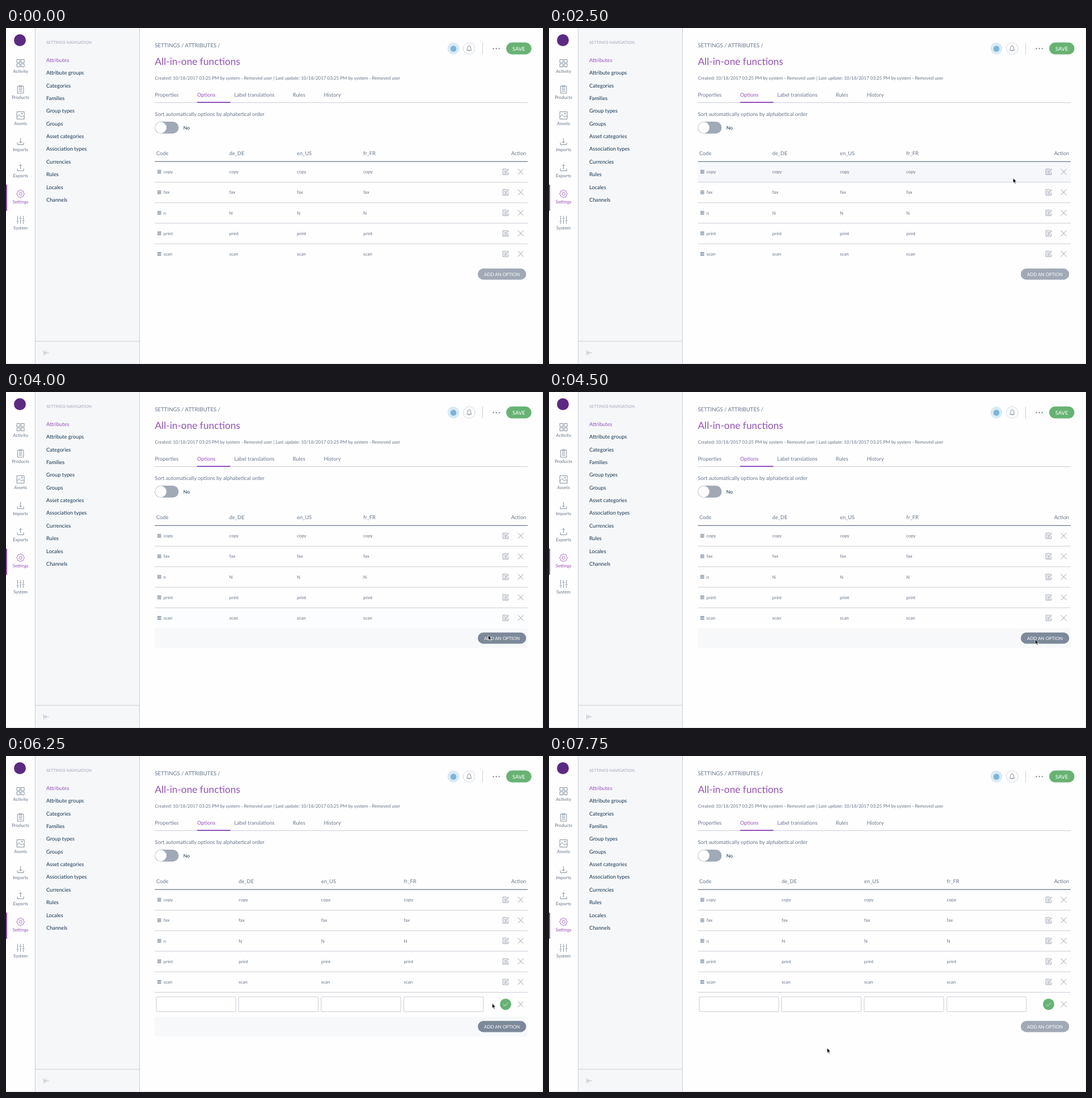
Recreate the animation shown at these times as an HTML page. Size 947 by 592 pixels, loop 8000 ms.

```html
<!DOCTYPE html>
<html lang="en">
<head>
<meta charset="utf-8">
<title>Attribute options</title>
<style>
html, body { margin: 0; width: 100%; height: 100%; overflow: hidden; background: #fefefe; }
svg { display: block; width: 947px; height: 592px; font-family: Lato, "Open Sans", sans-serif; text-rendering: geometricPrecision; }
.icon { fill: none; stroke: #67768a; stroke-width: .8; }
.light { stroke: #9aa3b0; stroke-width: .75; }
</style>
</head>
<body>
<svg id="stage" viewBox="0 0 947 592"></svg>
<script>
const PURPLE = '#9452ba', GREY = '#67768a', NAVY = '#11324d', LINE = '#c9cdd6', GREEN = '#67b373';
const ROW = 36.17, TOP = 235.6;
const stage = document.getElementById('stage');

// y is the middle of the capitals
const text = (s, x, y, size = 9.25, fill = GREY, anchor = 'start') =>
  `<text x="${x}" y="${y + size * .36}" font-size="${size}" fill="${fill}" text-anchor="${anchor}">${s}</text>`;
const rect = (x, y, w, h, fill, extra = '') =>
  `<rect x="${x}" y="${y}" width="${w}" height="${h}" fill="${fill}" ${extra}/>`;
const circle = (x, y, r, fill, extra = '') => `<circle cx="${x}" cy="${y}" r="${r}" fill="${fill}" ${extra}/>`;
const icon = (x, y, d, extra = '') => `<path class="icon" transform="translate(${x} ${y})" d="${d}" ${extra}/>`;
const cross = y => icon(907.6, y, 'M-5-5L5 5M5-5L-5 5', 'style="stroke:#808b9b"');

function gear() {
  let d = '';
  for (let i = 0; i < 32; i++) {
    const a = (i - .5) * Math.PI / 16, r = i % 4 < 2 ? 6.9 : 5.5;
    d += (i ? 'L' : 'M') + (r * Math.cos(a)).toFixed(2) + ' ' + (r * Math.sin(a)).toFixed(2);
  }
  return d + 'ZM2.5 0A2.5 2.5 0 1 1-2.5 0A2.5 2.5 0 1 1 2.5 0';
}

function menu() {
  const items = [
    ['Activity', 'M-6.5-6.5h5.5v5.5h-5.5zM1-6.5h5.5v5.5H1zM-6.5 1h5.5v5.5h-5.5zM1 1h5.5v5.5H1z'],
    ['Products', 'M-2-5.5h-3.3V6.8H5.3V-5.5H2M-2-6.8H2v2.3H-2zM-3-2H3M-3 .7H3M-3 3.4H3'],
    ['Assets', 'M-6.5-6.5h13v13h-13zM-6.5 3l4-4.5L1.5 3 4 .5 6.5 3M3.6-3.3a1 1 0 1 1-2 0a1 1 0 1 1 2 0'],
    ['Imports', 'M-5.5 1.5V5.5H5.5V1.5M0-6V2.5M-2.6 0L0 2.6 2.6 0'],
    ['Exports', 'M-5.5 1.5V5.5H5.5V1.5M0 2.5V-5.5M-2.6-3L0-5.6 2.6-3'],
    ['Settings', gear()],
    ['System', 'M-5-7V1.5M-5 4V7M0-7V-4M0-1.5V7M5-7V0M5 2.5V7M-7 2.7h4M-2-2.7h4M3 1.2h4']
  ];
  return items.map(([name, d], i) => {
    const on = name == 'Settings', y = 62 + 46.03 * i;
    return icon(25.6, y, d, on ? `style="stroke:${PURPLE}"` : '') +
      text(name, 25.6, y + 14.3, 7.95, on ? PURPLE : GREY, 'middle');
  }).join('');
}

function sidebar() {
  const names = ['Attributes', 'Attribute groups', 'Categories', 'Families', 'Group types', 'Groups',
    'Asset categories', 'Association types', 'Currencies', 'Rules', 'Locales', 'Channels'];
  return rect(52, 0, 183, 591, '#f6f7f9') +
    rect(51, 0, 1, 591, LINE) + rect(235, 0, 1, 591, LINE) + rect(52, 551.5, 183, 1, LINE) +
    text('SETTINGS NAVIGATION', 71, 25.6, 7.3, '#a1a9b7') +
    names.map((s, i) => text(s, 71, 56.6 + 22.36 * i, 9.25, i ? NAVY : PURPLE)).join('') +
    icon(70.5, 572.3, 'M-3.8-4.5V4.5M5 0H-2.5M.8-3.3L-2.5 0 .8 3.3', 'style="stroke:#a1a9b7"');
}

function header() {
  const tabs = [['Properties', 262.4], ['Options', 337], ['Label translations', 402.4], ['Rules', 505.8], ['History', 560.6]];
  const stamp = '10/18/2017 03:25 PM by system - Removed user';
  return text('SETTINGS / ATTRIBUTES /', 262.4, 30.8, 9.6) +
    text('All-in-one functions', 262.4, 58.3, 17.3, PURPLE) +
    text(`Created: ${stamp} | Last update: ${stamp}`, 262.4, 88.5, 8) +
    tabs.map(([s, x]) => text(s, x, 117.2, 9.25, s == 'Options' ? PURPLE : GREY)).join('') +
    rect(262.4, 131, 657.6, 1, LINE) + rect(337, 130, 58.6, 2, PURPLE) +
    circle(789, 36, 10.5, '#d8ebf6') + circle(789, 36.5, 5.3, '#7db4d6') +
    circle(816.8, 36, 10.3, 'none', `stroke="${LINE}" stroke-width=".8"`) +
    icon(816.8, 36, 'M-4.2 3.2Q-2.9 2-2.9-1Q-2.9-4.5 0-4.5T2.9-1Q2.9 2 4.2 3.2ZM-1.2 3.4a1.2 1.2 0 0 0 2.4 0M0-5.5V-4.5') +
    rect(840, 25.5, 1, 21, LINE) +
    [859.6, 864.7, 869.8].map(x => circle(x, 36.2, 1.2, '#8792a2')).join('') +
    rect(882, 25.6, 44.7, 21, GREEN, 'rx="10.5"') + text('SAVE', 904.2, 36.2, 9.25, '#fff', 'middle') +
    text('Sort automatically options by alphabetical order', 262.4, 152, 9.25) +
    rect(262.4, 165, 42.1, 21, '#a1a9b7', 'rx="10.5"') + circle(273, 175.5, 9.9, '#fff') +
    text('No', 312.8, 175.5, 8.6, NAVY);
}

function table(adding, hover, pressed) {
  const cols = adding ? [410.3, 555.8, 701.6] : [393.8, 513, 630];
  const shift = adding ? 43 : 0, end = TOP + 5 * ROW;
  let out = hover.map(([i, alpha]) => i < 5
    ? rect(262.4, TOP + ROW * i + .5, 657.6, ROW - .8, '#f6f7fa', `opacity="${alpha}"`)
    : rect(262.4, end + shift, 657.6, 34.7, '#f7f8f9', `opacity="${alpha}"`)).join('');
  out += text('Code', 265, 220.4) + text('Action', 917.3, 220.4, 9.25, GREY, 'end') +
    ['de_DE', 'en_US', 'fr_FR'].map((s, i) => text(s, cols[i], 220.4)).join('') +
    rect(262.4, 234.7, 657.6, 1.2, GREY);
  ['copy', 'fax', 'n', 'print', 'scan'].forEach((s, i) => {
    const y = 253.3 + ROW * i;
    out += icon(270.3, y, 'M-3.4-2.4H3.4M-3.4 0H3.4M-3.4 2.4H3.4', `style="stroke:${NAVY}"`) +
      text(s, 277.8, y, 7.95) +
      cols.map(x => text(s == 'n' ? 'N' : s, x, y, 7.95)).join('') +
      icon(881, y, 'M2-4.8H-4.7V5H4.5V.5M-2.7-2H0M-2.7 .3H-1M-2.7 2.8H2.5M0 1.2L.6-1 4.2-5 5.4-3.9 1.9 .3Z', 'style="stroke:#808b9b"') +
      cross(y);
    if (i < 4 || adding) out += rect(262.4, TOP + ROW * (i + 1) - .6, 657.6, 1, LINE);
  });
  if (adding) {
    out += [265, ...cols].map(x => rect(x, 424.3, 140.2, 26.2, '#fff', `stroke="${LINE}" rx="1"`)).join('') +
      circle(881, 437.4, 10, GREEN) +
      icon(881, 437.4, 'M-4 .2L-1.3 2.9 4.2-2.7', 'style="stroke:#fff"') + cross(437.4);
  }
  return out + rect(832, 423.8 + shift, 85.3, 19.7, pressed ? '#7c899a' : '#a1a9b7', 'rx="9.85"') +
    text('ADD AN OPTION', 874.6, 433.7 + shift, 7.95, '#fff', 'middle');
}

// [ms, pointer x, pointer y, row under it (5 = footer)]
const path = [
  [0, -20, -20, -1], [500, 928, 62, -1], [750, 903, 82, -1], [1000, 854, 151, -1], [1250, 852, 155, -1],
  [1500, 844, 172, -1], [1750, 830, 193, -1], [2000, 822, 220, -1], [2250, 819, 247, 0], [2500, 818, 264, 0],
  [2750, 818, 293, 1], [3000, 820, 334, 2], [3250, 820, 334, 2], [3500, 823.5, 372, 3], [3750, 834, 409, 4],
  [4000, 850, 428, 5], [4250, 855, 432, 5], [4500, 857, 435.5, 5], [6250, 857, 435.5, 5], [6750, 800, 483, 5],
  [7000, 670, 533, -1], [7250, 625, 537, -1], [7500, 609, 537, -1], [7750, 490, 514, -1]
];

const fixed = rect(0, 0, 947, 592, '#fefefe') + menu() + sidebar() + rect(0, 276, 2, 46, PURPLE) + header() +
  rect(0, 591, 947, 1, '#e4e6ea') + rect(946, 0, 1, 592, '#e9ebee');
stage.innerHTML = fixed + '<g id="table"></g><path id="pointer" fill="#000" stroke="#fff" stroke-width=".7" d="M.4 .3V9L2.4 7.3 3.8 10.6 5.2 10 3.8 6.8H6.4Z"/>';
const tableGroup = document.getElementById('table'), pointer = document.getElementById('pointer');

let shown = -1;
function frame(now) {
  const t = now % 8000;
  const k = path.findLastIndex(p => p[0] <= t);
  if (k != shown) {
    const [ms, x, y, row] = path[k], before = k ? path[k - 1][3] : -1;
    const hover = row == before ? [[row, 1]] : [[before, .3], [row, row == 5 ? 1 : .45]];
    tableGroup.innerHTML = table(ms >= 6250, hover.filter(h => h[0] >= 0 && !(ms >= 7000)), ms >= 4000 && ms < 6750);
    pointer.setAttribute('transform', `translate(${x} ${y})`);
    shown = k;
  }
  requestAnimationFrame(frame);
}
requestAnimationFrame(frame);
// Plain mark in place of the logo
stage.insertAdjacentHTML('beforeend', circle(24.5, 21.5, 10.5, '#5c2a82'));
</script>
</body>
</html>
```
